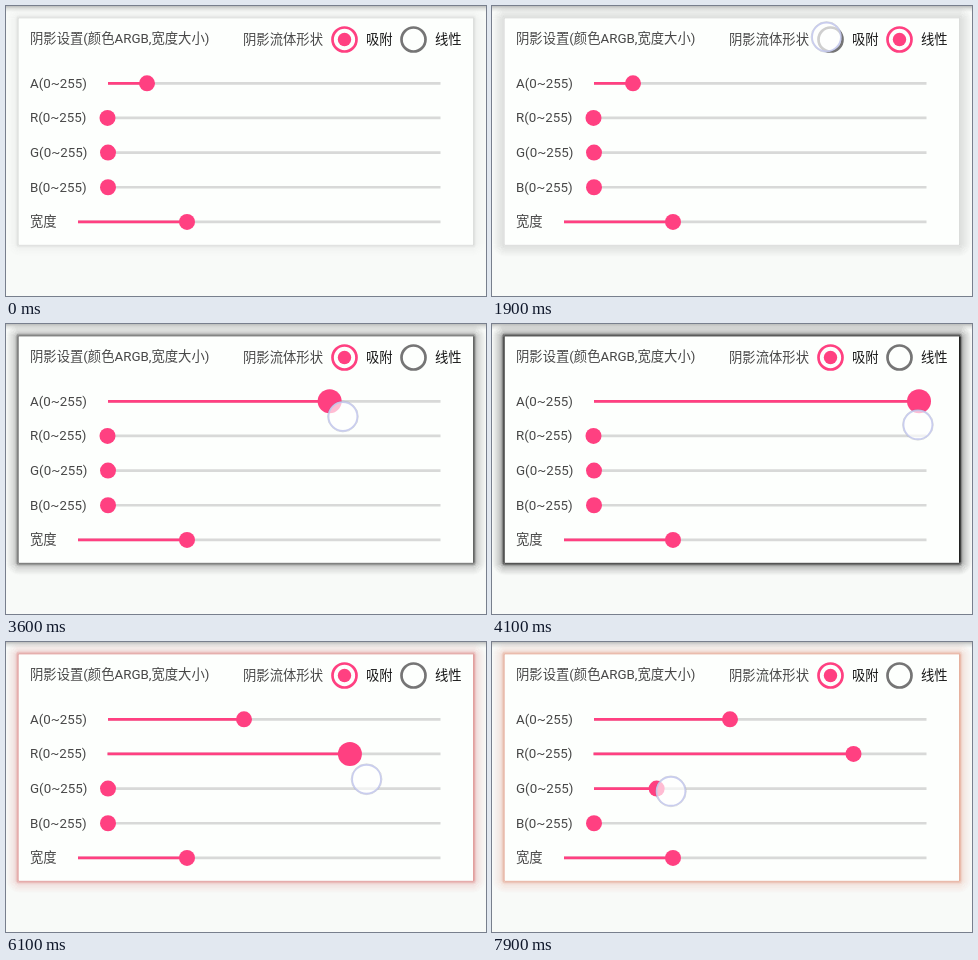
These frames come from a looping animation (480 px wide and 290 px high, 8 s). An HTML page:

```html
<!DOCTYPE html>
<html lang="zh">
<head>
<meta charset="utf-8">
<title>阴影设置</title>
<style>
html, body { margin: 0; width: 100%; height: 100%; overflow: hidden; background: #f8faf8; }
svg { display: block; width: 480px; height: 290px; }
text { font: 13.33px Roboto, "Noto Sans CJK SC", "Noto Sans CJK", sans-serif; fill: #484848; }
.dark { fill: #181818; }
.track, .fill { stroke-width: 2.7; }
.track { stroke: #d8d9d8; }
.fill { stroke: #ff4081; }
.thumb, .dot { fill: #ff4081; }
.ring { fill: none; stroke-width: 2.7; }
</style>
</head>
<body>
<svg viewBox="0 0 480 290">
  <defs>
    <linearGradient id="bar" x2="0" y2="1">
      <stop offset="0" stop-color="#000" stop-opacity=".24"/>
      <stop offset=".45" stop-color="#000" stop-opacity=".09"/>
      <stop offset="1" stop-color="#000" stop-opacity="0"/>
    </linearGradient>
  </defs>
  <g id="shadow" fill="none"></g>
  <rect width="480" height="6" fill="url(#bar)"/>
  <rect x="12.8" y="12.6" width="454.2" height="226" fill="#fdfffd"/>
  <text x="24" y="37">阴影设置(颜色ARGB,宽度大小)</text>
  <text x="237" y="38">阴影流体形状</text>
  <text class="dark" x="360" y="38">吸附</text>
  <text class="dark" x="429" y="38">线性</text>
  <g id="radios"></g>
  <g id="sliders"></g>
  <g id="touch">
    <circle r="15.4" fill="none" stroke="#556" stroke-opacity=".2"/>
    <circle r="14.4" fill="#fff" fill-opacity=".65" stroke="#c3c8ec" stroke-opacity=".9" stroke-width="1.7"/>
  </g>
</svg>
<script>
const LOOP = 8000, STEP = 100, REACH = 13, END = 434.5, LEAD = 40;
const $ = id => document.getElementById(id);

function set(el, attrs) {
  for (const k in attrs) el.setAttribute(k, attrs[k]);
}
function add(parent, tag, attrs) {
  const el = document.createElementNS("http://www.w3.org/2000/svg", tag);
  set(el, attrs);
  return parent.appendChild(el);
}

// Smooth 0 to 1 between two times
function ease(t, from, to) {
  const k = Math.min(1, Math.max(0, (t - from) / (to - from)));
  return k * k * (3 - 2 * k);
}

// Shadow: concentric rounded outlines around the card
const bands = [];
for (let d = 0.5; d < REACH; d++) {
  const el = add($("shadow"), "rect", {
    x: 12.8 - d, y: 12.6 - d, width: 454.2 + 2 * d, height: 226 + 2 * d, rx: d, "stroke-width": 1
  });
  bands.push({ el, k: d / REACH });
}
const clingy = k => 0.32 * (1 - k) + 0.58 / (1 + (k / 0.17) ** 4);

const radios = [338.5, 407.5].map(cx => ({
  ring: add($("radios"), "circle", { class: "ring", cx, cy: 33.5, r: 12 }),
  dot: add($("radios"), "circle", { class: "dot", cx, cy: 33.5 })
}));

// A drag goes out to peak, back to end, while the finger sinks by drop
const sliders = [
  { name: "A(0~255)", x: 102, rest: 141,
    drag: { down: 2870, turn: 4100, up: 5000, peak: 427, end: 238, drop: 23 } },
  { name: "R(0~255)", x: 101.5, rest: 101.5,
    drag: { down: 5410, turn: 6460, up: 7150, peak: END, end: 361.5, drop: 34 } },
  { name: "G(0~255)", x: 102, rest: 102,
    drag: { down: 7600, turn: 8400, up: 9000, peak: 300, end: 300, drop: 7 } },
  { name: "B(0~255)", x: 102, rest: 102 },
  { name: "宽度", x: 72, rest: 181 }
];
sliders.forEach((s, i) => {
  const g = $("sliders"), y = s.y = 77.3 + 34.65 * i;
  add(g, "text", { x: 24, y: Math.floor(y + 4.8) }).textContent = s.name;
  add(g, "line", { class: "track", x1: s.x, x2: END, y1: y, y2: y });
  s.fill = add(g, "line", { class: "fill", x1: s.x, y1: y, y2: y });
  s.thumb = add(g, "circle", { class: "thumb", cy: y });
});

const taps = [
  { down: 800, up: 1000, x: 417, y: 24 },
  { down: 1900, up: 2000, x: 334.5, y: 31 }
];

function place({ rest, drag: d }, t) {
  if (!d) return rest;
  return rest + (d.peak - rest) * ease(t, d.down, d.turn) + (d.end - d.peak) * ease(t, d.turn, d.up);
}
function radius({ drag: d }, t) {
  return d ? 8 + 4 * (ease(t, d.down + 300, d.down + 450) - ease(t, d.up, d.up + 150)) : 8;
}
function finger(t) {
  const held = p => p && t >= p.down && t <= p.up;
  const s = sliders.find(s => held(s.drag));
  if (!s) return taps.find(held);
  const { down, turn, drop } = s.drag;
  return { x: place(s, t + LEAD), y: s.y + 0.5 + drop * ease(t, down, turn) };
}

function draw(t) {
  const linear = ease(t, 1000, 1200) - ease(t, 2000, 2200);
  radios.forEach((r, i) => {
    const on = i ? linear : 1 - linear;
    r.ring.setAttribute("stroke", on >= 0.5 ? "#ff4081" : "#757575");
    r.dot.setAttribute("r", 6.7 * on);
  });

  const [a, ...rgb] = sliders.map(s => {
    const x = place(s, t);
    s.fill.setAttribute("x2", x);
    set(s.thumb, { cx: x, r: radius(s, t) });
    return (x - s.x) / (END - s.x);
  });
  $("shadow").setAttribute("stroke", `rgb(${rgb.slice(0, 3).map(v => Math.round(v * 255))})`);
  for (const { el, k } of bands) {
    el.setAttribute("stroke-opacity", a * (linear >= 0.5 ? 1 - k : clingy(k)));
  }

  const p = finger(t);
  $("touch").style.display = p ? "" : "none";
  if (p) $("touch").setAttribute("transform", `translate(${p.x} ${p.y})`);
}

const start = performance.now();
function frame() {
  const t = (performance.now() - start) % LOOP;
  draw(Math.floor(t / STEP) * STEP);
  requestAnimationFrame(frame);
}
frame();
</script>
</body>
</html>
```
